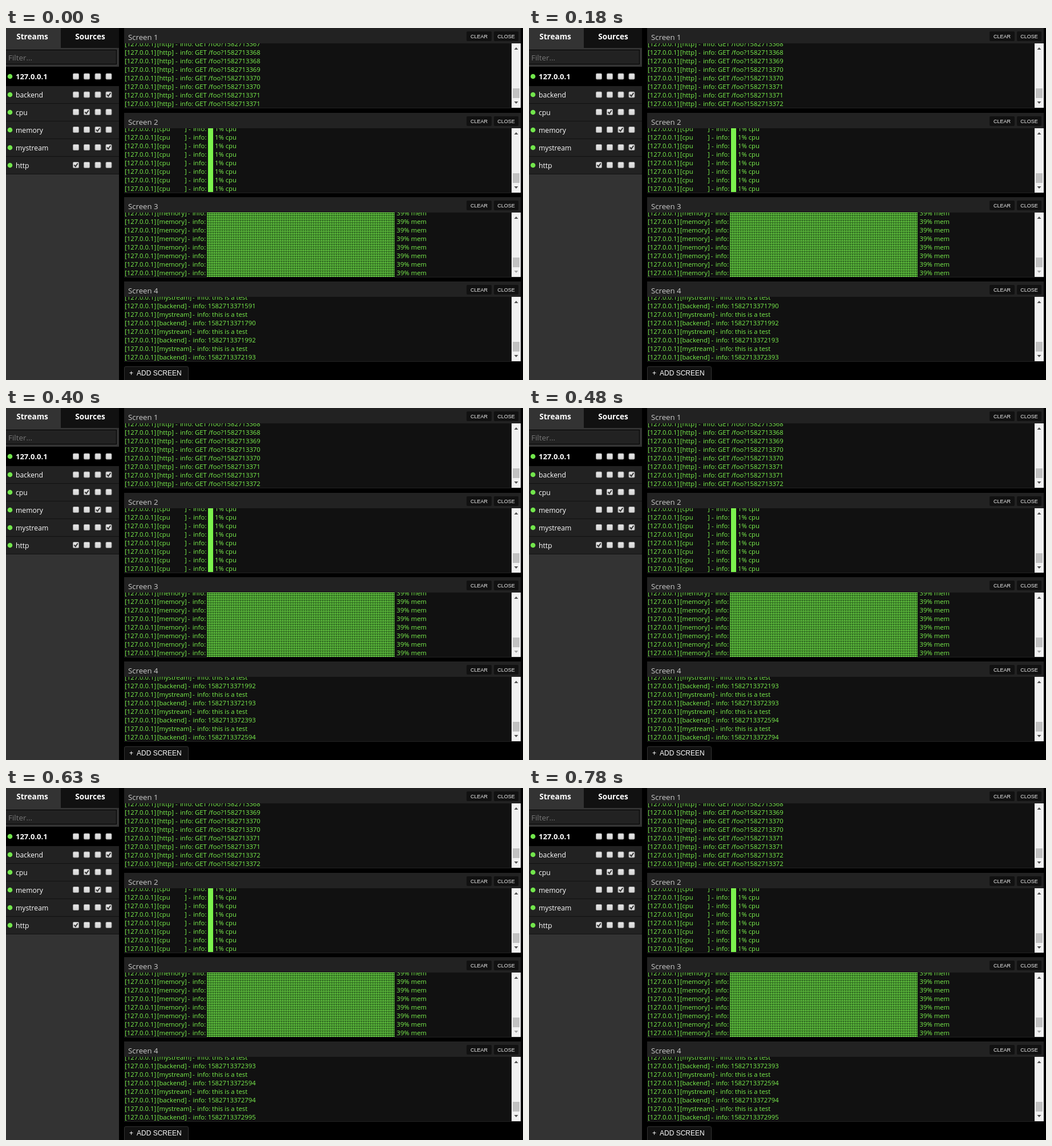
These frames come from a looping animation (906x618 px, 850 ms). An HTML page:

```html
<!DOCTYPE html>
<html lang="en">
<head>
<meta charset="utf-8">
<title>Log streams</title>
<style>
  html, body { margin: 0; width: 100%; height: 100%; overflow: hidden; background: #000; }
  svg { display: block; width: 906px; height: 618px; }
  text { font-family: "Open Sans", "Noto Sans", sans-serif; white-space: pre; }
  .log { font-size: 11.3px; fill: #7bf24d; }
  .tab { font-size: 13.6px; font-weight: 700; fill: #fff; text-anchor: middle; }
  .hint { font-size: 13.4px; fill: #777; }
  .name { font-size: 12.2px; fill: #fff; }
  .host { font-size: 13px; font-weight: 700; fill: #fff; }
  .title { font-size: 13.2px; fill: #ccc; }
  .btn { font: 9px "Liberation Sans", Arial, sans-serif; fill: #eee; text-anchor: middle; }
  .add { font: 12px "Liberation Sans", Arial, sans-serif; fill: #fff; }
</style>
</head>
<body>
<svg id="stage" viewBox="0 0 906 618"></svg>
<script>
const LOOP = 850, PITCH = 15, GREEN = '#7bf24d';
const stage = document.getElementById('stage');

function add(parent, tag, attrs = {}, content) {
  const el = document.createElementNS('http://www.w3.org/2000/svg', tag);
  for (const key in attrs) el.setAttribute(key, attrs[key]);
  if (content !== undefined) el.textContent = content;
  parent.appendChild(el);
  return el;
}
const rect = (parent, x, y, width, height, fill, more) =>
  add(parent, 'rect', { x, y, width, height, fill, ...more });
const label = (parent, cls, x, y, content) =>
  add(parent, 'text', { class: cls, x, y }, content);
const shape = (parent, d, fill, more) => add(parent, 'path', { d, fill, ...more });

const defs = add(stage, 'defs');
const shade = add(defs, 'pattern',
  { id: 'shade', width: 4, height: 3, patternUnits: 'userSpaceOnUse' });
rect(shade, 0, 0, 4, 3, '#1f4a17');
rect(shade, 0, 0, 4, 1, GREEN);
rect(shade, 0, 1, 2, 1, '#55b23a');

const face = add(defs, 'linearGradient', { id: 'face', x2: 0, y2: 1 });
add(face, 'stop', { offset: 0, 'stop-color': '#e9e9e9' });
add(face, 'stop', { offset: 1, 'stop-color': '#d4d4d4' });

// Sidebar
function checkbox(x, y, on) {
  rect(stage, x - 5, y - 5, 10, 10, 'url(#face)', { rx: 1.5, stroke: '#999' });
  if (on) shape(stage, `M${x - 3} ${y}l2.3 2.6l4 -5.6`, 'none',
    { stroke: '#333', 'stroke-width': 2 });
}

function streamRow(name, y, boxY, checked, cls) {
  add(stage, 'circle', { cx: 7, cy: y, r: 4.3, fill: '#72e64c' });
  label(stage, cls, 17, y + 4.6, name);
  [122.5, 141.5, 161, 180].forEach((x, i) => checkbox(x, boxY, i === checked));
}

rect(stage, 0, 0, 198, 618, '#333');
rect(stage, 96, 0, 102, 35, '#111');
label(stage, 'tab', 46, 20, 'Streams');
label(stage, 'tab', 147.5, 20, 'Sources');
rect(stage, -0.5, 38.5, 194, 25, '#222', { stroke: '#000' });
label(stage, 'hint', 4, 56.5, 'Filter...');
rect(stage, 0, 68, 198, 34, '#000');
streamRow('127.0.0.1', 85, 85, -1, 'host');
[['backend', 3], ['cpu', 1], ['memory', 2], ['mystream', 3], ['http', 0]]
  .forEach(([name, checked], i) => {
    const y = 102 + 31 * i;
    rect(stage, 0, y, 198, 31, '#222');
    rect(stage, 0, y + 30, 198, 1, '#111');
    streamRow(name, y + 15, y + (i ? 14.5 : 15), checked, 'name');
  });

// Log panels
function button(name, x, y, width) {
  rect(stage, x, y, width, 17, '#111', { rx: 2 });
  label(stage, 'btn', x + width / 2, y + 11.5, name);
}

function scrollbar(top, atEnd) {
  rect(stage, 886, top, 16, 113, '#f1f1f1');
  rect(stage, 888, top + 79, 12, 17, '#c1c1c1');
  shape(stage, `M890.5 ${top + 11}h7l-3.5 -4z`, '#505050');
  shape(stage, `M890.5 ${top + 102}h7l-3.5 4z`, atEnd ? '#a3a3a3' : '#505050');
}

// Returns a clipped group whose last visible row sits at index 7
function panel(n, top) {
  const body = top + 27;
  rect(stage, 207, top, 695, 141, '#222');
  rect(stage, 207, body, 695, 113, '#111');
  label(stage, 'title', 214, top + 21.3, 'Screen ' + n);
  button('CLEAR', 807, top + 6, 44);
  button('CLOSE', 855, top + 6, 43);
  const clip = add(defs, 'clipPath', { id: 'clip' + n });
  rect(clip, 207, body, 679, 113);
  const view = add(stage, 'g', { 'clip-path': `url(#clip${n})` });
  scrollbar(body, n === 3);
  return add(view, 'g');
}

function logLine(group, top, row, tag, dash, message, msgX = dash + 34.1) {
  const line = add(group, 'text', { class: 'log', y: top + 136.5 + (row - 7) * PITCH });
  const parts = [[208, '[127.0.0.1]'], [264.7, tag], [dash, '-'],
    [dash + 8, 'info:'], [msgX, message]];
  for (const [x, content] of parts) add(line, 'tspan', { x }, content);
  return line;
}

// steps: [time in ms, rows scrolled]
function scroll(group, steps) {
  const frames = [[0, 0], ...steps, [LOOP, steps[steps.length - 1][1]]]
    .map(([time, rows]) => ({
      offset: time / LOOP,
      transform: `translateY(${-rows * PITCH}px)`,
      easing: 'steps(1, end)'
    }));
  group.animate(frames, { duration: LOOP, iterations: Infinity });
}

const [top1, top2, top3, top4] = [0, 149, 297, 445];

const http = panel(1, top1);
[367, 368, 368, 369, 370, 370, 371, 371, 372, 372].forEach((sec, row) =>
  logLine(http, top1, row, '[http]', 296.9, 'GET /foo?1582713' + sec));
scroll(http, [[60, 1], [540, 2]]);

const cpu = panel(2, top2);
const memory = panel(3, top3);
for (let row = 0; row < 8; row++) {
  const line = logLine(cpu, top2, row, '[cpu', 320, '1% cpu', 366);
  add(line, 'tspan', { x: 313 }, ']');
  logLine(memory, top3, row, '[memory]', 318.7, '39% mem', 684.5);
}
rect(cpu, 354, 176, 9, 112, GREEN);
rect(memory, 352, 324, 329, 113, 'url(#shade)');

const backend = panel(4, top4);
[1591, 1790, 1992, 2193, 2393, 2594, 2794, 2995].forEach((ms, i) => {
  logLine(backend, top4, 2 * i, '[mystream]', 326.9, 'this is a test');
  logLine(backend, top4, 2 * i + 1, '[backend]', 319.6, '158271337' + ms);
});
scroll(backend, [[60, 2], [260, 4], [480, 6], [630, 8]]);

rect(stage, 207.5, 594.5, 112, 30, '#111', { rx: 2, stroke: '#333' });
label(stage, 'add', 216, 610, '+');
label(stage, 'add', 229, 610, 'ADD SCREEN');
</script>
</body>
</html>
```
